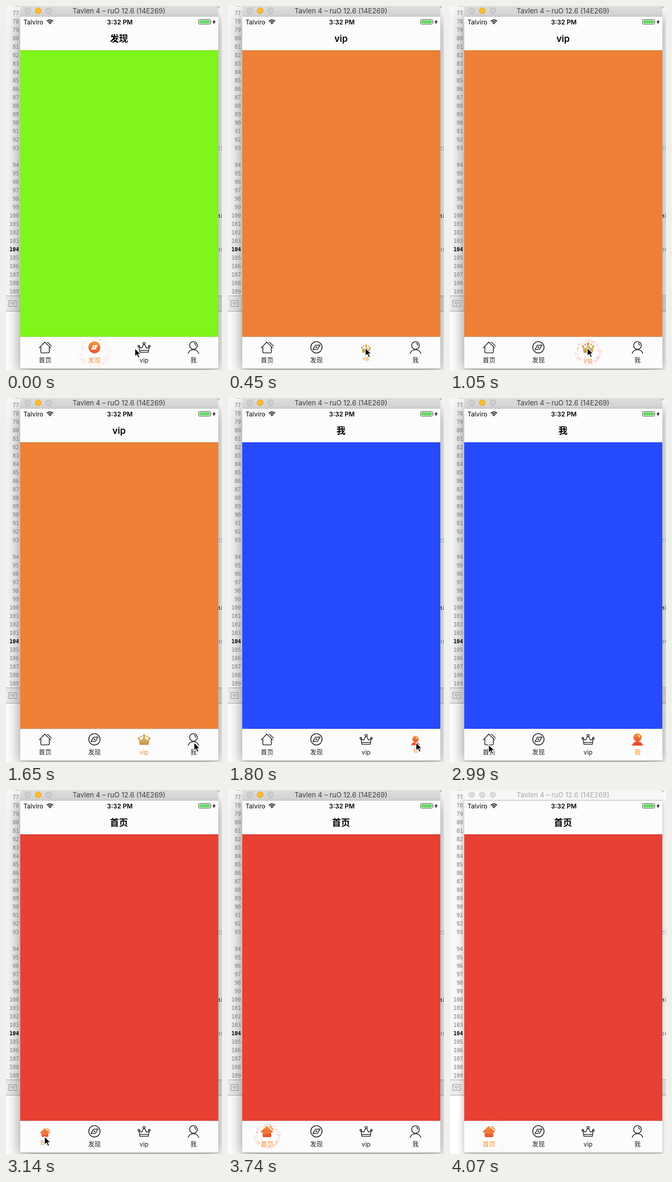
An HTML page that plays this animation: 409x690 px, repeating every 4.1 s.

```html
<!DOCTYPE html>
<html lang="zh-CN">
<head>
<meta charset="utf-8">
<title>Tab bar</title>
<style>
  html, body { margin: 0; width: 100%; height: 100%; overflow: hidden; background: #fff; }
  svg { display: block; width: 409px; height: 690px; }
  text { font-family: Inter, "Noto Sans CJK SC", "Noto Sans CJK", sans-serif; }
  .mono text { font: 10px "DejaVu Sans Mono", monospace; }
  #lines text { fill: #777; text-anchor: end; }
  #lines .current { fill: #000; font-weight: bold; }
  .off { fill: none; stroke: #333; stroke-width: 1.6; stroke-linecap: round; stroke-linejoin: round; }
  .on { display: none; }
  .selected .off { display: none; }
  .selected .on { display: inline; }
  .tab text { font-size: 12px; text-anchor: middle; fill: #222; }
  .selected text { fill: #f29130; }
  #shade { fill: #000; opacity: .46; filter: url(#wide); }
  #lights circle { fill: #cfcfcf; stroke: #b5b5b5; }
  #lights .minimize { fill: #fdbd2e; stroke: #dfa023; }
  #caption { font-size: 13px; fill: #3c3c3c; text-anchor: middle; }
  .idle #shade { opacity: .3; filter: url(#narrow); }
  .idle #bar { fill: #f6f6f6; }
  .idle #lights circle { fill: #dcdcdc; stroke: #cfcfcf; }
  .idle #caption { fill: #a6a6a6; }
  #sparks { fill: none; stroke: #f98d8d; stroke-linecap: round; }
</style>
</head>
<body>
<svg id="stage" viewBox="0 0 409 690">
  <defs>
    <filter id="wide" x="-30%" y="-20%" width="160%" height="140%"><feGaussianBlur stdDeviation="15"/></filter>
    <filter id="narrow" x="-30%" y="-20%" width="160%" height="140%"><feGaussianBlur stdDeviation="7"/></filter>
    <linearGradient id="titlebar" x2="0" y2="1"><stop stop-color="#dedede"/><stop offset="1" stop-color="#d0d0d0"/></linearGradient>
    <linearGradient id="fire" x2="0" y2="1"><stop stop-color="#f39a38"/><stop offset="1" stop-color="#ea5130"/></linearGradient>
    <linearGradient id="gold" x2="0" y2="1"><stop stop-color="#e3bf78"/><stop offset="1" stop-color="#c4933f"/></linearGradient>
  </defs>

  <!-- editor behind the window -->
  <rect width="409" height="690" fill="#fff"/>
  <rect width="27" height="549" fill="#f7f7f7"/>
  <rect y="549" width="409" height="30" fill="#ececec"/>
  <path d="M0 549.5H409M0 578.5H409" stroke="#aaa"/>
  <rect id="shade" x="27" y="18" width="375" height="676"/>
  <g id="lines" class="mono"></g>
  <g fill="none" stroke="#929292"><rect x="5.500" y="558.500" width="14" height="11"/><path d="M9 562.500h7l-3.500 4z"/></g>
  <g class="mono">
    <text x="401" y="4" fill="#3c8ca5">c</text>
    <text x="400" y="273" fill="#3c8ca5">ci</text>
    <text x="400" y="401" fill="#111">ai</text>
    <text x="400" y="465" fill="#2c78ad">or</text>
  </g>

  <!-- simulator window -->
  <rect id="bar" x="27" width="375" height="20" fill="url(#titlebar)"/>
  <path d="M27 19.500H402" stroke="#b4b4b4"/>
  <g id="lights"><circle cx="41" cy="9" r="5.500"/><circle class="minimize" cx="61" cy="9" r="5.500"/><circle cx="81" cy="9" r="5.500"/></g>
  <text id="caption" x="214" y="14">Tavlen 4 – ruO 12.6 (14E269)</text>
  <rect x="27" y="20" width="375" height="667" fill="#fcfcfc"/>
  <text x="33" y="34.500" font-size="12">Talviro</text>
  <g fill="none" stroke="#000" stroke-width="1.800">
    <path d="M77.500 28.800a8 8 0 0 1 11.400 0M79.600 31.200a5 5 0 0 1 7.200 0"/>
  </g>
  <path d="M81.300 32.800a2.700 2.700 0 0 1 3.800 0l-1.900 2z"/>
  <text x="215.500" y="34.500" font-size="12" font-weight="600" text-anchor="middle">3:32 PM</text>
  <rect x="364.500" y="25.500" width="23" height="9" rx="2" fill="none" stroke="#555"/>
  <rect x="366" y="27" width="20" height="6" rx="1" fill="#65d864"/>
  <path d="M388.500 28.500q1.500 1.500 0 3z" fill="#555"/>
  <path d="M395.500 25.500l-4.500 5.300h2.600l-1.200 4 4.600-5.400h-2.700z"/>
  <text id="heading" x="214" y="68" font-size="17" font-weight="600" text-anchor="middle"></text>
  <rect id="page" x="27" y="84" width="375" height="543"/>
  <path d="M27 84.250H402M27 627.250H402" stroke="#000" stroke-opacity=".25" stroke-width=".5"/>

  <path id="sparks"/>
  <g class="tab">
    <g class="off"><path d="M63 648L73.500 637 84.500 648M66 646.500V656q0 1.500 1.500 1.500H80.500q1.500 0 1.500-1.500V647M78.500 637.500L86 644.500"/></g>
    <g class="on"><path d="M73.500 636.500L62 647.500q-.5 1.500 1 1.500h2.500v7q0 2 2 2H80q2 0 2-2v-7h2.500q1.500 0 .500-1.500z" fill="url(#fire)"/>
      <path d="M79 637.500L85.500 644" stroke="#f08a35" stroke-width="2" stroke-linecap="round"/>
      <path d="M66 649.500H82" stroke="#f7a985" stroke-width=".8"/></g>
    <text x="73.900" y="676">首页</text>
  </g>
  <g class="tab">
    <g class="off"><circle cx="167.400" cy="647" r="10.700"/><path d="M165.500 643.200L174 642.500 169.500 650.800 161 651.500z"/><circle cx="167.400" cy="647" r=".7"/></g>
    <g class="on"><circle cx="167.400" cy="647" r="11.300" fill="url(#fire)"/><path d="M165.300 643L174 642.500 169.500 651 161 651.500z" fill="#fff"/><circle cx="167.400" cy="647" r="1.500" fill="#ef7934"/></g>
    <text x="167.600" y="676">发现</text>
  </g>
  <g class="tab">
    <g class="off"><path d="M253.500 656.500H269.500L271 646.500 266 648.500 262.500 641.500H260.500L257 648.500 252 646.500zM254 653H269"/>
      <g fill="#fcfcfc"><circle cx="261.500" cy="639.700" r="2"/><circle cx="251.500" cy="645" r="1.600"/><circle cx="271.500" cy="645" r="1.600"/></g></g>
    <g class="on" fill="url(#gold)"><path d="M253 657.500H270q.8-6 2-11l-6 2-3.500-7h-2l-3.500 7-6-2q1.300 5 2 11z"/>
      <circle cx="261.500" cy="639.700" r="2.600"/><circle cx="251.800" cy="645" r="2.300"/><circle cx="271.200" cy="645" r="2.300"/><circle cx="255.800" cy="641.500" r="1.700"/><circle cx="267.200" cy="641.500" r="1.700"/></g>
    <text x="261.400" y="676">vip</text>
  </g>
  <g class="tab">
    <g class="off"><circle cx="355" cy="643.500" r="7.300"/><path d="M345 658.500Q347.500 651.500 355 651.500T365 658.500M356.500 639.500q2.500 1 2.700 3.500"/></g>
    <g class="on"><path d="M344.500 659Q347 651 355 651T365.500 659z" fill="#e8502d"/><circle cx="355" cy="643.500" r="7.800" fill="url(#fire)"/><path d="M356.500 639.500q2.700 1 2.800 3.700" fill="none" stroke="#fff" stroke-width="1.500" stroke-linecap="round"/></g>
    <text x="355.100" y="676">我</text>
  </g>
  <path d="M27 687.500H402" stroke="#b0b0b0"/>
  <path id="cursor" d="M0 0V15.500L3.600 12.200 6.300 18 9 16.800 6.400 11.200H11.500z" stroke="#fff" stroke-width="1.200"/>
</svg>
<script>
const $ = id => document.getElementById(id);
const LOOP = 4100;
const tabs = [...document.querySelectorAll('.tab')];
const pages = [
  { name: '首页', color: '#e84033' },
  { name: '发现', color: '#80f51a' },
  { name: 'vip', color: '#ee8035' },
  { name: '我', color: '#264bfe' }
];
// [time, tab]
const taps = [[-750, 1], [450, 2], [1800, 3], [3140, 0]];
// [time, x, y] of the pointer tip
const path = [
  [0, 244, 649], [300, 260, 648], [1050, 260, 648], [1500, 356, 653], [2100, 356, 653],
  [2850, 73, 657], [3140, 73, 657], [3290, 4, 674], [3440, -30, 700]
];

for (let n = 76; n < 110; n++) {
  const label = document.createElementNS('http://www.w3.org/2000/svg', 'text');
  label.textContent = n;
  label.setAttribute('x', 24.5);
  label.setAttribute('y', 17 + 16 * (n - 77 + (n > 93)));
  if (n === 104) label.setAttribute('class', 'current');
  $('lines').append(label);
}

let seed = 17;
const random = () => (seed = seed * 16807 % 2147483647) / 2147483647;
const sparks = Array.from({ length: 150 }, () => ({
  angle: random() * Math.PI * 2,
  delay: random() * .1,
  speed: 24 + random() * 18,
  life: .45 + random() * .35
}));

// The screen refreshes in coarse ticks.
function tick(t) {
  if (t >= 4070) return 4070;
  if (t < 2990) return Math.floor(t / 150) * 150;
  return Math.min(3890, 2990 + Math.floor((t - 2990) / 150) * 150);
}

function pointer(t) {
  const i = path.findIndex(p => p[0] > t);
  if (i < 0) return path[path.length - 1].slice(1);
  const [a, b] = [path[i - 1], path[i]];
  const u = (t - a[0]) / (b[0] - a[0]);
  const k = u * u * (3 - 2 * u);
  return [a[1] + (b[1] - a[1]) * k, a[2] + (b[2] - a[2]) * k];
}

function burst(age, cx, cy) {
  let d = '';
  for (const s of sparks) {
    const t = age - s.delay;
    if (t < 0 || t > s.life) continue;
    const r = 12.5 + s.speed * t;
    d += `M${(cx + r * Math.cos(s.angle)).toFixed(1)} ${(cy + r * Math.sin(s.angle)).toFixed(1)}h.01`;
  }
  $('sparks').setAttribute('d', d);
  $('sparks').setAttribute('opacity', Math.max(0, Math.min(.9, 1.1 - age)));
  $('sparks').setAttribute('stroke-width', Math.max(.5, 1.6 - age));
}

let last = -1;
function draw(now) {
  const t = tick(now % LOOP);
  if (t !== last) {
    last = t;
    const [start, active] = taps.filter(tap => tap[0] <= t).pop();
    const age = t - start;
    const cx = 27 + 375 * (active + .5) / 4;
    tabs.forEach((tab, i) => {
      tab.classList.toggle('selected', i === active);
      const scale = i === active && age < 150 ? .78 : 1;
      tab.setAttribute('transform', `translate(${cx} 656) scale(${scale}) translate(${-cx} -656)`);
    });
    $('heading').textContent = pages[active].name;
    $('page').setAttribute('fill', pages[active].color);
    burst((age - 270) / 1000, cx, 656);
    $('cursor').setAttribute('transform', `translate(${pointer(t)})`);
    $('stage').classList.toggle('idle', t >= 4070);
  }
  requestAnimationFrame(draw);
}
const begin = performance.now();
const run = () => draw(performance.now() - begin);
function draw0() {}
requestAnimationFrame(run);
</script>
</body>
</html>
```
